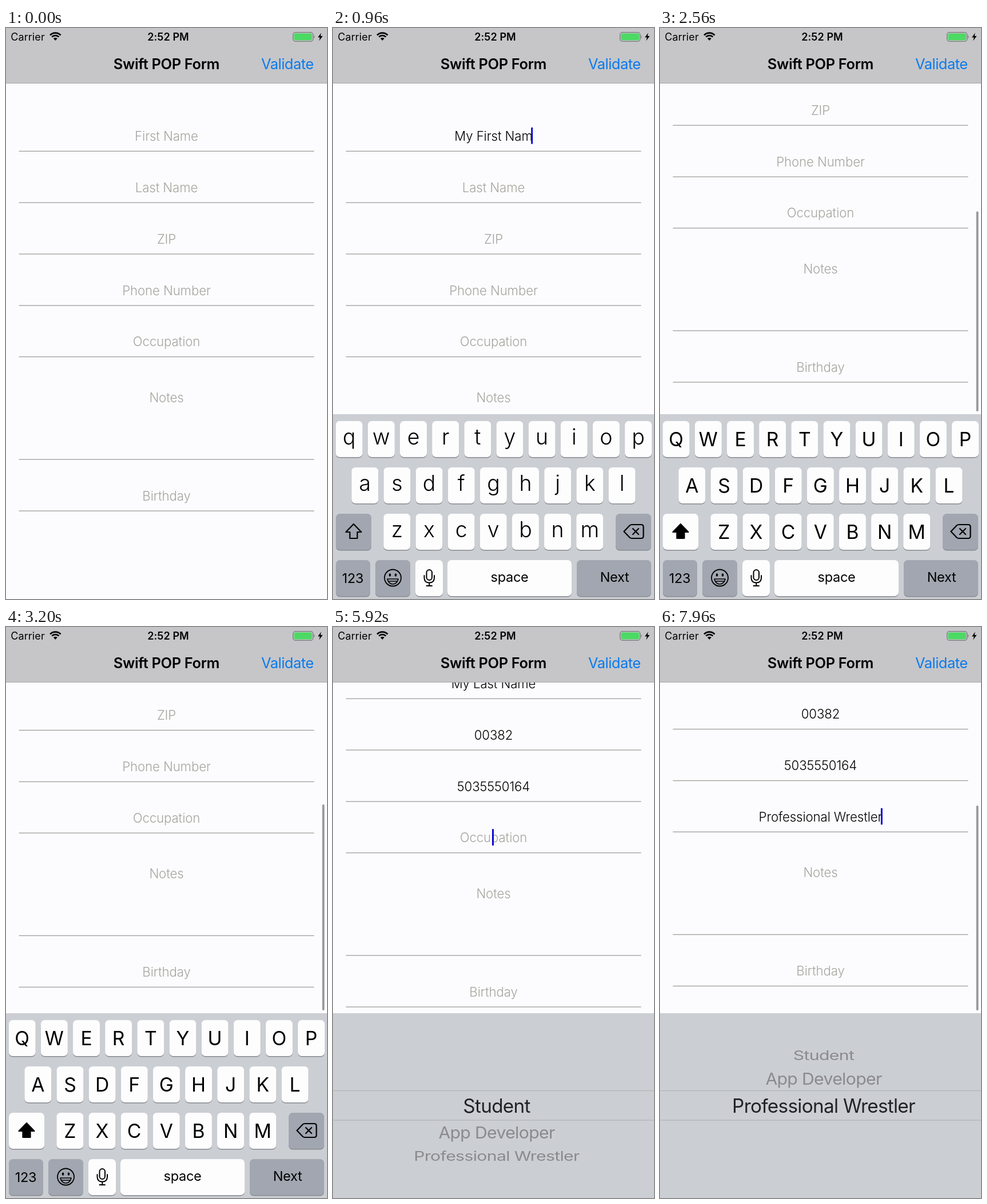
An HTML page that plays this animation: 561 by 998 pixels, repeating every 8 s.

```html
<!DOCTYPE html>
<html lang="en">
<head>
<meta charset="utf-8">
<title>Swift POP Form</title>
<style>
  html, body { margin: 0; width: 561px; height: 998px; overflow: hidden; background: #fcfcfe; }
  svg { display: block; font-family: Inter, Roboto, sans-serif; }
  text { text-anchor: middle; white-space: pre; }
  .field { font-size: 22.2px; font-weight: 300; letter-spacing: -.1px; }
  .title { font-size: 25.4px; font-weight: 600; letter-spacing: -.35px; }
  .action { font-size: 25.4px; letter-spacing: -.5px; text-anchor: end; fill: #0a7aef; }
  .status { font-size: 18px; letter-spacing: .1px; }
  .lower { font-size: 37.4px; font-weight: 300; }
  .upper { font-size: 33.6px; }
  .word { font-size: 23.5px; letter-spacing: -.3px; }
  .digit { font-size: 37px; }
  .sub { font-size: 14.8px; font-weight: 600; letter-spacing: 3.7px; }
  .row { font-size: 33.3px; letter-spacing: -.7px; }
  .line { fill: none; stroke: #000; stroke-width: 2.2; stroke-linejoin: round; stroke-linecap: round; }
</style>
</head>
<body>
<svg id="stage" width="561" height="998" viewBox="0 0 561 998"></svg>
<script>
const LOOP = 8000, STEP = 40, MID = 280.5, MAX_SCROLL = 180;
const WHITE = '#fdfdfe', GREY = '#a1a6b0', PANEL = '#cbced3';
const clamp = v => Math.max(0, Math.min(1, v));
const ease = v => { v = clamp(v); return v * v * (3 - 2 * v); };
const $ = id => document.getElementById(id);

const rect = (x, y, w, h, fill, r = 0, more = '') =>
  `<rect x="${x}" y="${y}" width="${w}" height="${h}" rx="${r}" fill="${fill}" ${more}/>`;
const label = (x, y, cls, str) => `<text x="${x}" y="${y}" class="${cls}">${str}</text>`;
const key = (x, y, w, h, fill = WHITE) =>
  rect(x, y + 1.6, w, h, '#888b90', 7) + rect(x, y, w, h, fill, 7);
const group = (id, body) => `<g id="${id}">${body}</g>`;

// Form fields: placeholder, underline height, gap from baseline to underline
const fields = [
  ['First Name', 215.3], ['Last Name', 305.2], ['ZIP', 395], ['Phone Number', 485],
  ['Occupation', 574.6], ['Notes', 754, 100.5], ['Birthday', 844]
].map(([hint, line, gap = 18.3]) => ({ hint, line, gap }));

// Typing: field, text, time of first character, time per character
const entries = [
  [0, 'My First Nam', 520, 40], [0, 'My First Name', 1280, 0],
  [1, 'My Last Name', 1680, 40], [2, '00382', 4080, 80],
  [3, '5035550164', 4800, 75], [4, 'Professional Wrestler', 7040, 0]
];
const focusTimes = [[80, 0], [1440, 1], [2320, -1], [3720, 2], [4720, 3], [5880, 4]];
const jobs = ['Student', 'App Developer', 'Professional Wrestler'];

const backspace = (x, y) => `<path class="line" transform="translate(${x} ${y})"
  d="M-17 0L-7 -10.5Q-5.5 -12 -3 -12H13Q17 -12 17 -8V8Q17 12 13 12H-3Q-5.5 12 -7 10.5ZM-1.5 -5L8.5 5M8.5 -5L-1.5 5"/>`;

function letters(upper) {
  const cls = upper ? 'upper' : 'lower', drop = upper ? 43.8 : 41;
  const rows = [['qwertyuiop', 4.7], ['asdfghjkl', 32.3], ['zxcvbnm', 88.3]];
  return rows.map(([row, x0], r) => [...row].map((c, i) => {
    const x = x0 + i * 56.15, y = 687 + r * 81;
    return key(x, y, 47, 63) + label(x + 23.5, y + drop, cls, upper ? c.toUpperCase() : c);
  }).join('')).join('') +
    key(5, 849, 62, 63, upper ? WHITE : GREY) +
    `<path class="line" style="fill:${upper ? '#000' : 'none'}" d="M36 867L49.5 881H42.5V892H29.5V881H22.5Z"/>`;
}

const controls = key(494, 849, 62, 63, GREY) + backspace(525.5, 880) +
  key(5, 930, 60, 63, GREY) + label(34.5, 970, 'word', '123') +
  key(74, 930, 61, 63, GREY) +
  '<circle class="line" style="stroke-width:1.8" cx="104.5" cy="961" r="14.5"/>' +
  '<ellipse cx="99.5" cy="956" rx="1.8" ry="2.8"/><ellipse cx="109.5" cy="956" rx="1.8" ry="2.8"/>' +
  '<path class="line" style="stroke-width:1.6" d="M95 963H114Q112 972 104.5 972Q97 972 95 963ZM96.5 967H112.5"/>' +
  key(144, 930, 48, 63) +
  rect(163.5, 947, 9.5, 18, 'none', 4.75, 'class="line" style="stroke-width:2"') +
  '<path class="line" style="stroke-width:2" d="M159.5 957V961Q159.5 969.5 168.25 969.5Q177 969.5 177 961V957M168.25 970V975M163.5 975H173"/>' +
  key(200, 930, 217, 63) + label(308.5, 968, 'word', 'space') +
  key(426, 930, 130, 63, GREY) + label(492, 968, 'word', 'Next');

function numberPad() {
  const subs = ['', 'ABC', 'DEF', 'GHI', 'JKL', 'MNO', 'PQRS', 'TUV', 'WXYZ'];
  const cell = (n, col, row, sub) => {
    const x = 9 + col * 184, y = 683.7 + row * 80.3, mid = 94.5 + col * 186;
    return key(x, y, 175, 69.5) +
      label(mid, y + (sub === null ? 47.5 : 37.5), 'digit', n) +
      (sub ? label(mid + 2.5, y + 58.5, 'sub', sub) : '');
  };
  return subs.map((s, i) => cell(i + 1, i % 3, Math.floor(i / 3), s)).join('') +
    cell(0, 1, 3, null) + '<circle cx="91.5" cy="964.5" r="2.2"/>' + backspace(468.5, 957.5);
}

function wifi() {
  const arc = r => {
    const d = r * Math.SQRT1_2;
    return `M${86.3 - d} ${21.7 - d}A${r} ${r} 0 0 1 ${86.3 + d} ${21.7 - d}`;
  };
  return `<path d="${arc(4.8)}L86.3 22Z"/><path d="${arc(8.6)}${arc(13.1)}" fill="none" stroke="#000" stroke-width="2.7"/>`;
}

const navBar = rect(0, 0, 561, 96, '#c6c6c8') + rect(0, 96, 561, 1, '#a8a8aa') +
  label(38, 22, 'status', 'Carrier') + wifi() +
  `<text x="283.5" y="22" class="status" style="font-weight:600">2:52 PM</text>` +
  rect(501.7, 7.7, 35, 15.6, 'none', 4, 'stroke="#77787a" stroke-width="1.3"') +
  rect(503.5, 9.5, 31.4, 12, '#4cd964', 2.5) +
  '<path d="M538.3 12.5Q540.8 15.5 538.3 18.5Z" fill="#77787a"/>' +
  '<path d="M550.8 8.5L545 16.5H548.7L547.2 22.5L553.5 14H549.7Z"/>' +
  label(280.5, 71.5, 'title', 'Swift POP Form') + label(537.5, 71.5, 'action', 'Validate');

$('stage').innerHTML = rect(0, 0, 561, 998, '#fcfcfe') +
  group('form', fields.map((f, i) =>
    `<text id="field${i}" class="field" x="${MID}" y="${f.line - f.gap}"></text>` +
    rect(22.5, f.line - .6, 516, 1.3, '#a09f9c')).join('') +
    rect(0, 0, 3, 29, '#0c0cd2', 1, 'id="caret"')) +
  rect(552.7, 100, 3.8, 394, '#98989b', 1.9, 'id="bar"') +
  group('panel', rect(0, 675, 561, 323, PANEL) +
    group('keys', group('low', letters(false)) + group('cap', letters(true)) + controls) +
    group('pad', numberPad()) +
    group('picker', rect(0, 810, 561, 1, '#aeb0b3') + rect(0, 861.5, 561, 1, '#aeb0b3') +
      jobs.map((j, i) => `<text id="job${i}" class="row">${j}</text>`).join(''))) +
  navBar;

const show = (id, on) => $(id).setAttribute('display', on ? 'inline' : 'none');
const set = (id, attrs) => { for (const k in attrs) $(id).setAttribute(k, attrs[k]); };

function scrollAt(t) {
  if (t < 2320) return 0;
  if (t < 3120) return 241.5 * (1 - Math.exp((2300 - t) / 97));
  if (t < 7520) return MAX_SCROLL + 61.5 * (1 - clamp((t - 3120) / 320)) ** 2;
  return MAX_SCROLL + 36.5 * Math.sin(clamp((t - 7480) / 480) * Math.PI / 2);
}

function valuesAt(t) {
  const out = fields.map(() => '');
  for (const [i, str, start, pace] of entries)
    if (t >= start) out[i] = pace ? str.slice(0, Math.floor((t - start) / pace) + 1) : str;
  return out;
}

function drawPicker(t) {
  const pos = 2 * ease((t - 6240) / 760), turn = .36, radius = 133.5;
  jobs.forEach((_, i) => {
    const d = i - pos, a = d * turn, near = 1 - clamp(Math.abs(d) * 1.25);
    const size = .905 + .095 * near, shade = Math.round(138 - 104 * near);
    set('job' + i, {
      transform: `translate(286 ${837 + radius * Math.sin(a)}) scale(${size} ${size * Math.cos(a)})`,
      y: 12, fill: `rgb(${shade},${shade},${shade + 4})`
    });
  });
}

function draw(t) {
  const values = valuesAt(t), scroll = scrollAt(t);
  let focus = -1;
  for (const [start, i] of focusTimes) if (t >= start) focus = i;

  fields.forEach((f, i) => {
    const el = $('field' + i);
    el.textContent = values[i] || f.hint;
    el.setAttribute('fill', values[i] ? '#000' : '#a6a59f');
  });
  set('form', { transform: `translate(0 ${-scroll})` });

  show('caret', focus >= 0);
  if (focus >= 0) {
    const half = values[focus] ? $('field' + focus).getComputedTextLength() / 2 : 0;
    set('caret', { x: MID + half - 2.5, y: fields[focus].line - 41.5 });
  }

  const over = Math.max(0, scroll - MAX_SCROLL), top = 100 + .975 * Math.min(scroll, MAX_SCROLL) + over;
  const fade = t < 2320 ? 0 : t < 7520 ? clamp((3440 - t) / 120) : clamp((t - 7480) / 80);
  set('bar', { y: top, height: 394.6 - over, opacity: fade });

  const text = focus < 0 ? '' : values[focus], caps = !text || text.endsWith(' ');
  set('panel', { transform: `translate(0 ${323 * (1 - ease((t - 40) / 440))})` });
  show('keys', t < 3720);
  show('cap', caps);
  show('low', !caps);
  show('pad', t >= 3720 && t < 5880);
  show('picker', t >= 5880);
  drawPicker(t);
}

function tick() {
  draw(Math.floor(performance.now() % LOOP / STEP) * STEP);
  requestAnimationFrame(tick);
}
tick();
</script>
</body>
</html>
```
